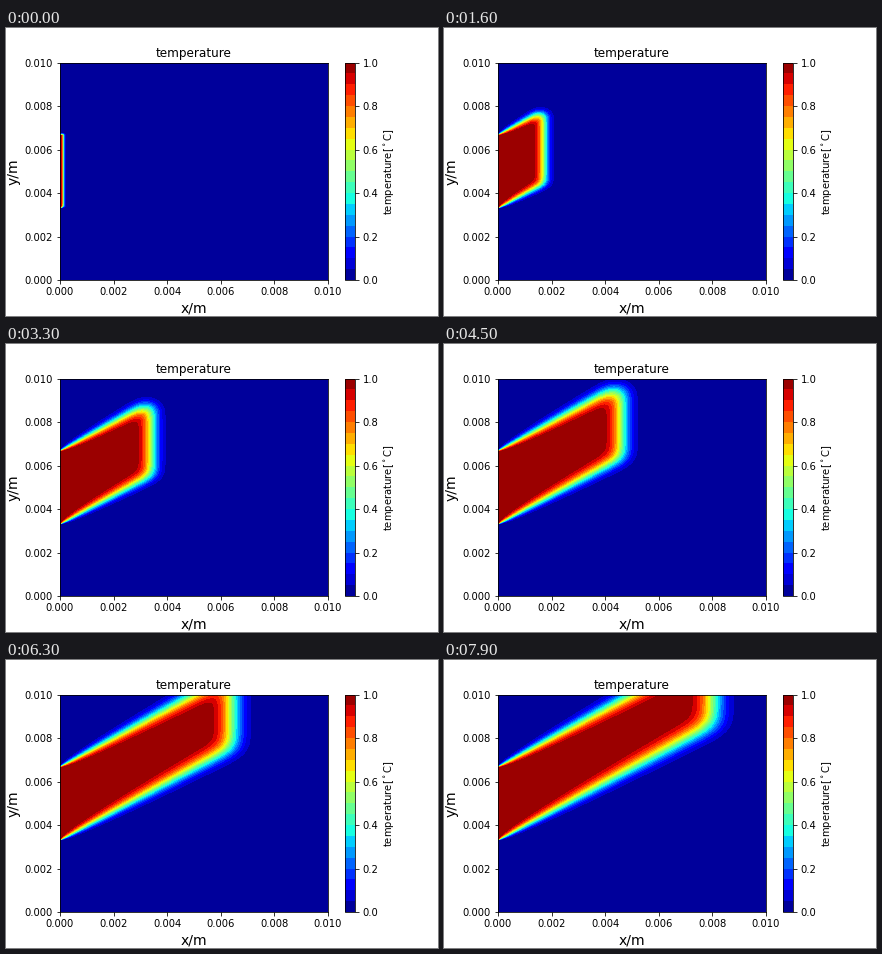
A matplotlib script for the animation above (8 s loop, 432x288 px).

```python
import numpy as np
import matplotlib.pyplot as plt
from matplotlib.animation import FuncAnimation

FRAMES, INTERVAL = 80, 100
SIZE = 0.01                 # side of the square domain, m
N = 340                     # cells per side
STEPS = 50                  # solver steps per frame
U, V = 1e-4, 1e-4 * 2 / 3   # flow per frame, m
LEVELS = np.linspace(0, 1, 21)

axis = np.linspace(0, SIZE, N + 1)


def solve():
    """First-order upwind advection of a hot inlet on the left wall."""
    h = SIZE / N
    cx, cy = U / STEPS / h, V / STEPS / h
    temp = np.zeros((N + 1, N + 1))
    temp[(axis >= SIZE / 3) & (axis <= SIZE * 2 / 3), 0] = 1
    core, left, below = temp[1:, 1:], temp[1:, :-1], temp[:-1, 1:]
    fields = []
    for _ in range(FRAMES):
        for _ in range(STEPS):
            core[:] = (1 - cx - cy) * core + cx * left + cy * below
        np.clip(temp, 0, 1, out=temp)
        temp[temp < 1e-12] = 0
        fields.append(temp.copy())
    return fields


fields = solve()

plt.rcParams["font.family"] = "DejaVu Sans"
fig = plt.figure(figsize=(6, 4), dpi=72, facecolor="white")
fig.subplots_adjust(left=0.125, right=0.9, bottom=0.125, top=0.88)
ax = fig.add_subplot()


def fill(field):
    return ax.contourf(axis, axis, field, LEVELS, cmap="jet")


contours = fill(fields[0])
bar = fig.colorbar(contours, ax=ax, ticks=np.linspace(0, 1, 6))
bar.set_label(r"temperature[$^\circ$C]", fontsize=10)
ax.set_title("temperature", fontsize=12)
ax.set_xlabel("x/m", fontsize=14)
ax.set_ylabel("y/m", fontsize=14)
ax.set_xlim(0, SIZE)
ax.set_ylim(0, SIZE)


def update(i):
    for old in list(ax.collections):
        old.remove()
    return [fill(fields[i])]


anim = FuncAnimation(fig, update, frames=FRAMES, interval=INTERVAL,
                     repeat=True, repeat_delay=0, blit=False)
plt.show()
```
